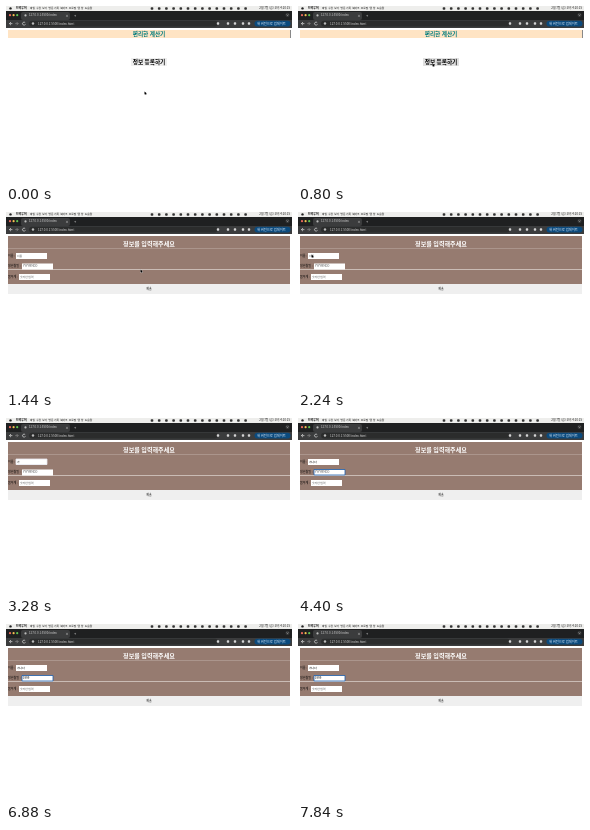
An HTML page with a canvas for the animation above (8 s loop, 286 by 178 pixels).

```html
<!DOCTYPE html>
<html lang="ko">
<meta charset="utf-8">
<style>
html, body { margin: 0; width: 100%; height: 100%; overflow: hidden; background: #fff }
canvas { display: block; width: 286px; height: 178px }
</style>
<canvas id="stage" width="286" height="178"></canvas>
<script>
const g = document.getElementById('stage').getContext('2d');
const LOOP = 8000, STEP = 80, FORM_AT = 1440;
const arrow = new Path2D('M0 0v3l.8-.6.5 1 .6-.3-.4-1h1z');

function rect(x, y, w, h, color) {
  g.fillStyle = color;
  g.fillRect(x, y, w, h);
}
function pill(x, y, w, h, r, color) {
  g.fillStyle = color;
  g.beginPath();
  g.roundRect(x, y, w, h, r);
  g.fill();
}
const dot = (x, y, r, color) => pill(x - r, y - r, 2 * r, 2 * r, r, color);

function stroke(d, color, width = 0.7) {
  g.strokeStyle = color;
  g.lineWidth = width;
  g.stroke(new Path2D(d));
}
function text(s, x, y, size, color, weight = 400, align = 'left') {
  g.font = `${weight} ${size}px "Noto Sans CJK KR", "Noto Sans CJK", "Noto Sans", sans-serif`;
  g.textAlign = align;
  g.textBaseline = 'middle';
  g.fillStyle = color;
  g.fillText(s, x, y);
}

function menuBar() {
  rect(0, 0, 286, 5, '#eeeeec');
  dot(4.5, 2.4, 1.2, '#222');
  text('브라우저', 10, 2.3, 2.9, '#000', 700);
  text('파일  수정  보기  방문 기록  북마크  프로필  탭  창  도움말', 24, 2.3, 2.7, '#111', 500);
  for (let x = 146; x < 244; x += 7.2) pill(x - 1.3, 1.2, 2.6, 2.5, 0.8, '#333');
  text('2월 7일 (금) 오후 4:20:15', 284, 2.3, 2.9, '#111', 500, 'right');
}

function tabBar() {
  rect(0, 5, 286, 9, '#1f2021');
  ['#ed6a5e', '#f4bf4f', '#61c554'].forEach((c, i) => dot(4 + i * 3.6, 9.2, 1.1, c));
  pill(15, 6, 49, 8, 2, '#3b3c3d');
  dot(19.5, 9.4, 1.1, '#bbb');
  text('127.0.0.1:5500/index', 23, 9.2, 2.9, '#ddd');
  text('×', 61, 9.2, 3.5, '#eee', 400, 'center');
  text('+', 69, 9.2, 4, '#ddd', 400, 'center');
  dot(281.5, 9, 2, '#3b3c3d');
  stroke('M280.6 8.6l.9.9.9-.9', '#ccc', 0.5);
}

function toolBar() {
  rect(0, 14, 286, 8, '#3b3c3d');
  pill(23, 14.7, 189, 5.8, 2.9, '#2b2c2c');
  stroke('M5 16l-1.6 1.6L5 19.2M3.4 17.6h3', '#ddd');
  stroke('M10.6 16l1.6 1.6-1.6 1.6M12.2 17.6h-3', '#888');
  stroke('M19.2 16.7a1.5 1.5 0 1 0 .2 1.5', '#ddd');
  dot(27, 17.5, 1.2, '#bbb');
  text('127.0.0.1:5500/index.html', 32, 17.5, 3, '#e0e0e0');
  for (const x of [212, 222, 229, 237, 243]) pill(x - 1.2, 16.3, 2.4, 2.5, 0.7, '#d5d5d5');
  pill(248.5, 14.7, 36, 5.8, 2.9, '#0b4a7d');
  text('새 버전으로 업데이트', 251, 17.5, 3.3, '#e4f1ff', 500);
}

function home(t) {
  rect(2, 24, 282, 8, '#ffe4c4');
  rect(284, 24, 0.7, 8, '#555');
  text('편리한 계산기', 143, 27.5, 5.7, '#007c7c', 700, 'center');
  rect(125, 52, 36, 8, t < 800 ? '#efefef' : '#e0e0e0');
  text('정보 등록하기', 143, 55.5, 5.7, '#000', 700, 'center');
}

function field(label, x, y, value, hint, focus) {
  text(label, 2, y + 2.5, 3, '#000', 500);
  rect(x, y, 31, 6, '#fff');
  if (focus) stroke(`M${x} ${y}h31v5.5h-31z`, focus, 0.8);
  text(value || hint, x + 1, y + 2.7, 2.8, value ? '#000' : '#555', 500);
}

// Letters appear from start to end; a pace below 1 slows the first gap
function typed(s, start, end, t, pace = 1) {
  if (t < start) return '';
  const done = Math.min(1, (t - start) / (end - start));
  return s.slice(0, 1 + Math.floor(done ** (1 / pace) * (s.length - 1)));
}

function form(t) {
  rect(2, 24, 282, 48, '#967b70');
  rect(2, 36, 282, 0.7, '#b5a199');
  rect(2, 57, 282, 0.8, '#d8ccc7');
  text('정보를 입력해주세요', 143, 31.9, 6.1, '#fff', 700, 'center');
  field('이름 :', 10, 41, typed('가나다', 2800, 3600, t, 0.4), '이름',
    t >= 2400 && t < 4240 && '#e8e8ee');
  field('생년월일 :', 16, 51.5, typed('1999', 5280, 6640, t), 'YYYYMMDD',
    t >= 4240 && '#1b5fae');
  field('몸무게 :', 13, 62, '', '숫자만 입력', false);
  rect(2, 72, 282, 10, '#efefef');
  text('제출', 143, 76.5, 2.9, '#000', 500, 'center');
}

function pointer(t) {
  if (t >= 2560) return;
  const glide = (start, end) => {
    const k = Math.min(1, Math.max(0, (t - start) / (end - start)));
    return k * k * (3 - 2 * k);
  };
  const up = glide(80, 480), across = glide(1600, 2240);
  g.save();
  g.translate(138.5 - 4 * up - 121 * across, 85.5 - 28 * up - 15 * across);
  g.strokeStyle = '#fff';
  g.lineWidth = 0.5;
  g.stroke(arrow);
  g.fillStyle = '#000';
  g.fill(arrow);
  g.restore();
}

function draw() {
  const t = Math.floor(performance.now() % LOOP / STEP) * STEP;
  rect(0, 0, 286, 178, '#fff');
  menuBar();
  tabBar();
  toolBar();
  (t < FORM_AT ? home : form)(t);
  pointer(t);
  requestAnimationFrame(draw);
}
draw();
</script>
</html>
```
